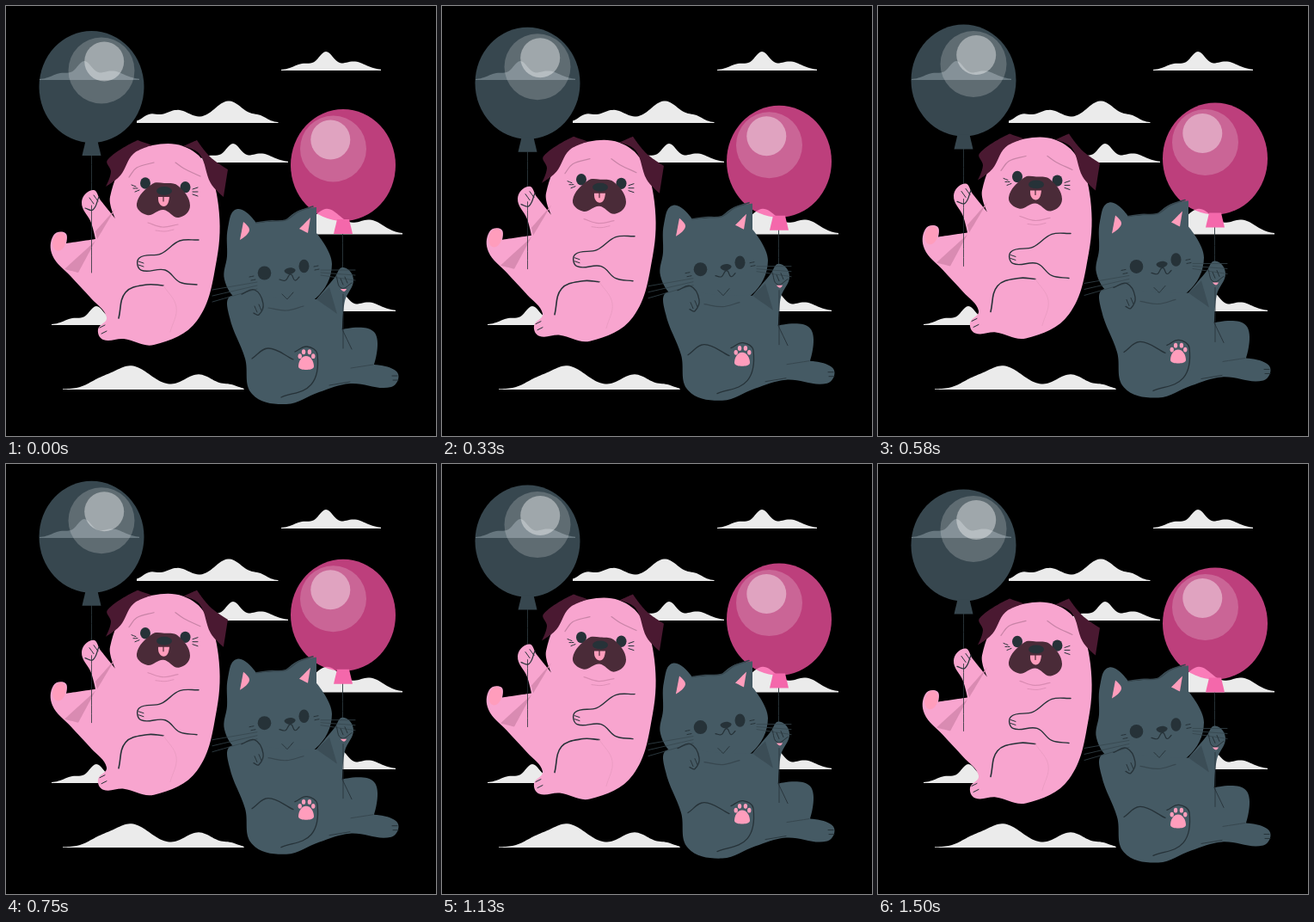
Write an HTML page with a canvas that moves like this. It is 500 by 500 pixels and loops after 1.54 s.

```html
<!DOCTYPE html>
<html lang="en">
<head>
<meta charset="utf-8">
<title>Floating friends</title>
<style>
html, body { margin: 0; width: 100%; height: 100%; overflow: hidden; background: #000; }
canvas { display: block; width: 500px; height: 500px; }
</style>
</head>
<body>
<canvas id="stage" width="500" height="500"></canvas>
<script>
const ctx = document.getElementById('stage').getContext('2d');
const LOOP = 1540, FRAMES = 37, RISE = 10, PEAK = 733;
const PINK = '#f8a5cf', PINK_SHADE = '#d98bb2', ROSE = '#ff9dbc', MAROON = '#4a1931';
const SLATE = '#455a64', SLATE_DARK = '#37474f', INK = '#263238', CLOUD = '#ebebeb';

// Smooth curve through key points "x,y x,y"; a trailing "!" marks a sharp corner.
function curve(text, closed) {
  const pts = text.trim().split(/\s+/).map(word => {
    const [x, y] = word.split(',').map(parseFloat);
    return { x, y, sharp: word.endsWith('!') };
  });
  const n = pts.length, path = new Path2D();
  const at = i => closed ? pts[(i + n) % n] : pts[Math.max(0, Math.min(n - 1, i))];
  const slope = i => {
    if (at(i).sharp) return [0, 0];
    const dx = at(i + 1).x - at(i - 1).x, dy = at(i + 1).y - at(i - 1).y;
    const length = Math.hypot(dx, dy) || 1;
    return [dx / length, dy / length];
  };
  path.moveTo(pts[0].x, pts[0].y);
  for (let i = 0; i < (closed ? n : n - 1); i++) {
    const a = at(i), b = at(i + 1), [ax, ay] = slope(i), [bx, by] = slope(i + 1);
    const reach = .36 * Math.hypot(b.x - a.x, b.y - a.y);
    path.bezierCurveTo(a.x + ax * reach, a.y + ay * reach, b.x - bx * reach, b.y - by * reach, b.x, b.y);
  }
  return path;
}

function fill(text, color) {
  ctx.fillStyle = color;
  ctx.fill(curve(text, true));
}

function line(text, color = INK, width = 1.2) {
  ctx.strokeStyle = color;
  ctx.lineWidth = width;
  ctx.stroke(curve(text, false));
}

function oval(x, y, rx, ry, color, turn = 0) {
  ctx.fillStyle = color;
  ctx.beginPath();
  ctx.ellipse(x, y, rx, ry, turn, 0, Math.PI * 2);
  ctx.fill();
}

// Parallel short strokes: claws, whiskers and cheek marks.
function strokes(count, x, y, dx, dy, stepX, stepY, fan = 0, color = INK, width = 1) {
  for (let i = 0; i < count; i++) {
    const sx = x + i * stepX, sy = y + i * stepY;
    line(`${sx},${sy} ${sx + dx},${sy + dy + i * fan}`, color, width);
  }
}

// A cloud is a flat base under a sum of bell-shaped bumps [center, height, spread].
function cloud(left, base, width, bumps) {
  ctx.fillStyle = CLOUD;
  ctx.beginPath();
  ctx.moveTo(left, base);
  for (let x = 0; x <= width; x += 2) {
    const height = bumps.reduce((sum, [c, h, s]) => sum + h * Math.exp(-(((x - c) / s) ** 2)), .6);
    ctx.lineTo(left + x, base - height);
  }
  ctx.lineTo(left + width, base);
  ctx.fill();
}

const PEAKED = [[26, 7.5, 15], [52, 20.5, 12], [84, 10, 19]];
const WIDE = [[15, 8, 12], [47, 14.5, 22], [107, 25, 24], [143, 6, 12]];
const LONG = [[79, 27, 32], [41, 6, 18], [158, 17, 24], [195, 4, 12]];

function clouds() {
  for (const [x, y] of [[320, 75], [39, 86], [212, 182], [53, 371], [337, 355]]) cloud(x, y, 116, PEAKED);
  cloud(152, 136, 165, WIDE);
  cloud(66, 446, 211, LONG);
  cloud(361, 265.5, 100, [[12, 29, 24], [62, 16, 22]]);
}

function balloon(x, top, side, color, knot) {
  ctx.save();
  ctx.translate(x, top);
  oval(0, 65, 61, 65, color);
  fill('-7,128! 7,128! 11,145! -11,145!', knot);
  oval(11.5 * side, 46, 38.5, 38.5, 'rgba(255,255,255,.2)');
  oval(14.7 * side, 35.5, 23, 23, 'rgba(255,255,255,.4)');
  ctx.restore();
}

function pugBody() {
  fill(`170,162 206,163 232,184 247,232 245,295 222,366 172,394 137,387 113,388 107,376
    117,362 99,340 75,314 54,290 55,267 69,264 70,276! 104,271! 99,252 88,228
    101,214 110,226 127,247! 121,222 143,174`, PINK);
  fill('170,162! 153,156! 118,179 122,193 116,210! 133,197 148,172', MAROON);
  fill('206,163! 222,156! 238,176 258,190! 253,222! 238,206 225,172', MAROON);
  oval(62, 274, 7.5, 11, ROSE, .25);
  fill('127,236! 104,262! 106,271!', PINK_SHADE);
  fill('68,306! 104,273! 84,310!', PINK_SHADE);
  line('99.5,232 99.5,310', INK, .8);
}

function pugLimbs() {
  line('224,272 202,273 180,288 155,293 157,307 185,307 202,321 222,324', INK, 1.4);
  strokes(2, 154, 297, 6, 2, 0, 4);
  line('131,363 139,333 164,324 183,325', INK, 1.6);
  line('183,325 198,350 191,379', '#e99bc1', .8);
  strokes(2, 109, 374, 6, -3, 2, 7);
  line('92,235 101,237 108,222');
  strokes(2, 97, 223, 5, 7, 5, -3);
}

function pugFace() {
  line('143,199 152,188 172,182', '#c783a6');
  line('197,182 207,189 226,198', '#c783a6');
  for (const x of [162, 208.5]) oval(x, 206 + (x - 162) / 10, 6, 6.7, INK);
  fill('170,207 184,206 200,209 214,232 201,246 183,237 164,243 152,230', '#4a2b38');
  oval(184, 215, 9, 5, INK);
  fill('177,222! 190,222! 188,230 183,233 178,229', ROSE);
  line('183,220 183,227', '#4a2b38');
  strokes(3, 146, 208, 5, 2, 2, 4, -2);
  strokes(3, 217, 213, 6, -2, 0, 3, 2);
  line('165,252 182,257 200,254', PINK_SHADE);
  line('174,261 185,262 195,260', PINK_SHADE, .8);
}

function catBody() {
  // Head, then torso with the raised arm and legs
  fill(`257,291 258,258 269,236 291,252! 325,249! 340,238 361,234! 361,264!
    379,300 360,340 315,356 270,342 254,318`, SLATE);
  fill(`262,337 320,340 361,341! 382,316 392,304 404,318 394,343 391,376! 428,379
    428,417! 455,426 448,443 400,439 364,449 326,463 286,451 278,410 260,362`, SLATE);
  line('291,252 306,250 325,249 340,239 357,233', SLATE_DARK, 1.6);
  fill('276,251! 283,261 272,272!', ROSE);
  fill('354,246! 351,264! 341,259!', ROSE);
  fill('376,327! 385,358! 361,341!', '#3b4d56');
  line('392,335 392,398', INK, .8);
}

function catFace() {
  oval(300.5, 310.5, 7.8, 8, INK);
  oval(346.5, 302.5, 6, 7.7, INK);
  fill('324,307 336,306 330,312', INK);
  line('318,318 325,319 331,312 336,319 341,315');
  line('321,335 327,341! 334,333', INK, 1);
  strokes(3, 292, 321, -52, 9, 0, 4, 3, SLATE_DARK, .8);
  strokes(3, 366, 307, 40, 0, 0, 3, 3, SLATE_DARK, .8);
  strokes(2, 283, 315, 5, -1, 2, 4);
  strokes(2, 358, 303, 5, -1, 1, 4);
  line('305,351 326,354 346,349', SLATE_DARK);
}

function catLimbs() {
  line('274,335 289,330 299,346 294,359 288,357', INK, 1.3);
  strokes(2, 289, 349, 3, 7, 5, -2);
  line('384,314 390,328 402,322', INK, 1);
  strokes(2, 389, 317, 3, 7, 5, -2);
  fill('389,329! 396,329! 393,332', ROSE);
  line('286,410 305,398 334,411', INK, 1.3);
  line('336,402 350,396 362,405 355,440 320,455', INK, 1.3);
  fill('349,407 358,419 349,423 340,419', ROSE);
  for (let i = 0; i < 4; i++) {
    const angle = Math.PI * (1.08 + i * .28);
    oval(349.5 + 8 * Math.cos(angle), 409 + 7.5 * Math.sin(angle), 2.2, 2.9, ROSE);
  }
  line('391,376 402,399', INK, .9);
  line('427,417 401,421', SLATE_DARK, 1);
  line('376,441 400,437', INK, .8);
  strokes(2, 449, 430, 6, 0, 1, 5);
}

// Height rises and falls at constant speed.
function lift(ms) {
  const away = Math.abs(ms - PEAK);
  return RISE * (1 - Math.min(away, LOOP - away) / (LOOP / 2));
}

function draw(ms) {
  ctx.fillStyle = '#000';
  ctx.fillRect(0, 0, 500, 500);
  clouds();
  ctx.save();
  ctx.translate(0, .5 - lift(ms));
  line('99.5,174 99.5,216', '#2b373d', .9);
  line('391.5,264 391.5,308', '#2b373d', .9);
  balloon(99.5, 29, 1, 'rgba(69,89,99,.8)', SLATE_DARK);
  balloon(392, 120, -1, 'rgba(255,86,168,.74)', '#f468ab');
  pugBody();
  pugLimbs();
  pugFace();
  catBody();
  catFace();
  catLimbs();
  ctx.restore();
}

ctx.lineCap = ctx.lineJoin = 'round';
const start = performance.now();
function tick() {
  const step = LOOP / FRAMES;
  const ms = (performance.now() - start) % LOOP;
  draw(Math.floor(ms / step + .05) * step);
  requestAnimationFrame(tick);
}
tick();
</script>
</body>
</html>
```
